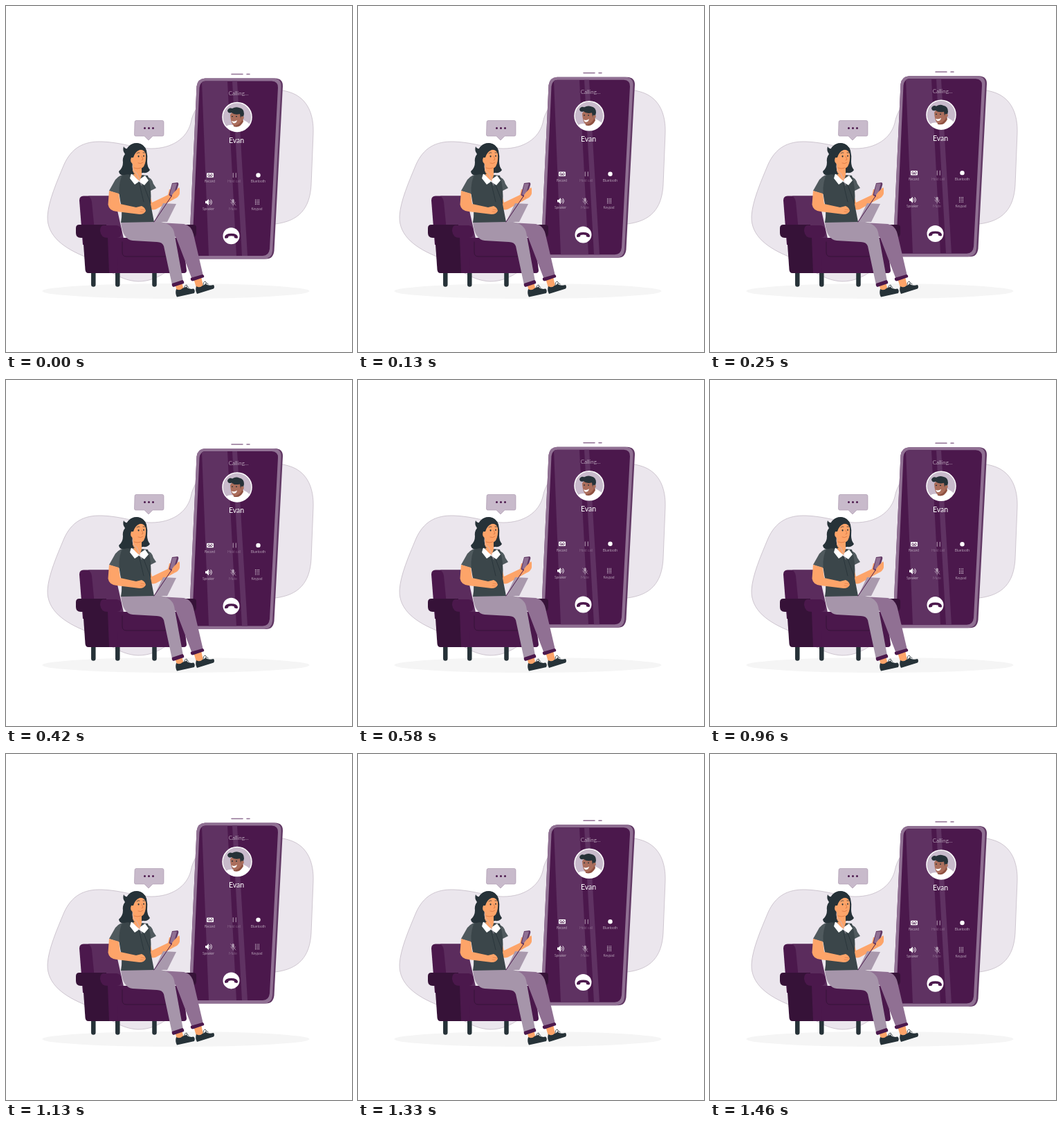
An HTML page that plays this animation: 500x500 px, repeating every 1500 ms.

```html
<!DOCTYPE html>
<html lang="en">
<head>
<meta charset="utf-8">
<title>Calling</title>
<style>
  html, body { margin: 0; width: 100%; height: 100%; overflow: hidden; background: #fff; }
  svg { display: block; width: 100%; height: 100%; }
  text { font-family: Lato, Inter, sans-serif; fill: #fff; text-anchor: middle; }
  .label { font-size: 5px; font-weight: 300; }
  .dim { opacity: .5; }
  .plum { fill: #4b184c; }
  .deep { fill: #361238; }
  .mauve { fill: #907093; }
  .lilac { fill: #c8bacb; }
  .skin { fill: #fda469; }
  .ink { fill: #263238; }
  .white { fill: #fff; }
  .line { fill: none; stroke-linecap: round; stroke-linejoin: round; }
</style>
</head>
<body>
<svg viewBox="0 0 500 500">
  <path fill="#ebe6ed" stroke="#b5aab7" stroke-width=".6" d="M60 304C61 282 74 253 83 231C94 205 112 195 139 196C168 197 187 206 210 206C239 206 261 192 267 169C273 136 304 119 341 118C372 117 399 120 414 126C436 135 445 157 444 184L441 259C439 293 423 311 389 315C350 320 302 332 270 355C240 377 222 398 191 398C166 397 150 383 116 363C83 350 59 332 60 304Z"/>
  <ellipse cx="245.500" cy="412" rx="193" ry="11" fill="#f5f5f5"/>

  <g id="bubble">
    <path class="lilac" stroke="#a693aa" stroke-width=".6" d="M188 165.500H226Q228 165.500 228 168V185.500Q228 188 226 188H212L206 194L200 188H187.500Q185.500 188 185.500 186L186 168Q186 165.500 188 165.500Z"/>
    <path class="line" stroke="#4b184c" stroke-width="3" stroke-dasharray="0 6" d="M200.500 176.500H213"/>
  </g>

  <g id="phone">
    <path class="line" stroke="#907093" stroke-width="1.500" d="M326 97.500H342M348 97.500H352"/>
    <path fill="#623965" d="M288 103.500H389Q400.500 104 400 115L387.500 353Q386 364.500 376 364.500H274Q264 363 264.500 353L275.500 115Q277 104 288 103.500Z"/>
    <path class="mauve" d="M287 103.500H386Q398 104 397.500 115L385 353Q384 364 373 364.500H274Q264 363 264.500 353L275.500 115Q277 104 287 103.500Z"/>
    <path class="plum" d="M288 107.500H384Q393.500 108 393 117L381 350Q380 359.700 371 360H277Q268.500 359 269 351L279.500 117Q280.500 108 288 107.500Z"/>
    <path fill="#5f3262" d="M283 109L286 107.700H320L333 360H293ZM327 107.500H334L349 360H341Z"/>

    <text x="336" y="128" font-size="8" font-weight="300">Calling...</text>
    <g id="avatar">
      <circle class="lilac" cx="334" cy="159.500" r="21"/>
      <path class="white" d="M318 173Q322 170 328 171L341 163Q349 166 352 170A21 21 0 0 1 318 173Z"/>
      <path fill="#8f5141" d="M328 167L341 158L343 166Q338 176 329 173Z"/>
      <path fill="#ab6e5c" d="M324 156L328 151L341 153L342 162Q338 171 331 172Q325 172 324 156Z"/>
      <path class="ink" d="M320 150Q322 145 327 147Q332 144 337 146Q344 147 344 155L342 163L339 161L338 155Q330 157 326 153Q321 155 320 150Z"/>
      <circle fill="#ab6e5c" cx="341.500" cy="160.500" r="2.300"/>
      <path class="ink" d="M326 158h2v1.300h-2ZM332 158h2v1.300h-2Z"/>
      <path class="white" d="M326 165Q330 167 334 164Q333 168.500 329 168.500Q327 168 326 165Z"/>
      <circle cx="334" cy="159.500" r="21" fill="none" stroke="#fff" stroke-width="1.500"/>
    </g>
    <text x="333" y="197" font-size="10.500">Evan</text>

    <g class="white">
      <rect x="290" y="240.300" width="10" height="6.500" rx="1"/>
      <path class="line" stroke="#4b184c" stroke-width=".8" d="M293 242a1.500 1.500 0 1 0 .1 0M297 242a1.500 1.500 0 1 0 .1 0M293 245h4"/>
      <path class="line dim" stroke="#fff" stroke-width="1.200" d="M328.300 240.500v6M332.300 240.500v6"/>
      <circle cx="364.500" cy="243.500" r="3.200"/>
      <path d="M288 280.800h2l3-2.800v9l-3-2.800h-2Z"/>
      <path class="line" stroke="#fff" stroke-width=".9" d="M294.500 280.500q1.500 2 0 4M296 279q3 3.500 0 7"/>
      <g class="dim">
        <rect x="326.500" y="278" width="3.400" height="6" rx="1.700"/>
        <path class="line" stroke="#fff" stroke-width=".8" d="M325 282.500q.5 3 3.200 3q2.700 0 3.200-3M328.200 285.500v2M324.500 278.500l7.500 8.500"/>
      </g>
      <path class="line" stroke="#fff" stroke-width="1.200" stroke-dasharray="0 2.200" d="M360.600 279v6.800M363 279v6.800M365.400 279v6.800"/>
    </g>
    <g class="label">
      <text x="294.500" y="254.500">Record</text>
      <text x="329.500" y="254.500" class="dim">Hold call</text>
      <text x="364.500" y="254.500">Bluetooth</text>
      <text x="292.500" y="293.800">Speaker</text>
      <text x="328" y="293.800" class="dim">Mute</text>
      <text x="362.500" y="293.800">Keypad</text>
    </g>
    <circle class="white" cx="325.500" cy="331.300" r="12"/>
    <path class="plum" d="M316 332.500Q317 328 325.500 327.800Q334 328 335 332.500Q335.300 335 333.500 334.800L330.500 334.200Q329.500 333.500 329.700 331.800Q325.500 330.500 321.500 331.800Q321.500 333.500 320.500 334.200L317.500 334.800Q315.700 335 316 332.500Z"/>
  </g>

  <g id="chair">
    <path class="line" stroke="#263238" stroke-width="6.500" d="M126.300 384V402.500M161.300 384V402.500M214.500 384V402.500"/>
    <path class="plum" d="M106 281Q106 274.500 112 274.500H150V345H111Z"/>
    <path fill="#5b2c5d" d="M119 274.500H150Q157 275 158 282L172 345H130L124 283Q123 277 119 274.500Z"/>
    <path class="deep" d="M240 321Q242 316 247 316H271Q275 316 275 320V329Q274 335 268 335H248Z"/>
    <path class="plum" d="M149 335H255L261 382Q261 386 257 386H149Z"/>
    <path class="line" stroke="#361238" stroke-width="1" d="M168 341V356Q168 362 174 362H250"/>
    <path class="deep" d="M111 330H150V386H119Q115 386 114.500 381Z"/>
    <path class="deep" d="M101 321Q101 316 106 316H145V335H108Q101 335 101 328Z"/>
    <path class="plum" d="M140 317H160Q167 318 167 326Q167 335 160 335L162 386H149L147 335Q137 335 136 325Q136 318 140 317Z"/>
  </g>

  <g id="woman">
    <path class="skin" d="M271 394L282 391L285 405L275 407ZM244 401L254 399L257 411L247 412Z"/>
    <path class="ink" d="M275 405Q280 408 284 404L289 402Q293 405 300 403Q302 406 300 408.500L276 416Q273 411 275 405ZM246 409Q251 412 255 408L260 406Q265 410 271 408.500Q274 411 272 415L247 420.500Q244 415 246 409Z"/>
    <path class="line" stroke="#263238" stroke-width=".8" d="M285 403q0-5 3-5q3 2-1 5M288 402q3-3 4 0M257 408q1-5 4-5q2 2-2 5M260 407q3-3 4 0"/>
    <path class="mauve" d="M222 313L257 315Q268 317 271 330L285 390L269 395L246 335Z"/>
    <path fill="#a695aa" d="M166 312L224 312Q240 315 243 327L256 398L240 403L228 347Q226 341 218 341L183 339Q168 337 166 312Z"/>
    <path class="plum" d="M267 393L284 388Q287 389 286 392L270 397.500Q266 397 267 393ZM240 401L255 396Q258 398 257 401L242 406Q239 405 240 401Z"/>

    <path class="skin" d="M204 259L211 284L234 273L236 265Q241 264 246 270L251 263V271Q250 276 243 279L217 293.500Q209 297 206 289Z"/>
    <path fill="#505a5e" d="M202 246Q211 248 213 257L217 263L207 268ZM177 242Q164 243 158 251L149 267L164 272L178 262Z"/>
    <path fill="#3b464a" d="M175 242L205 245Q211 264 209 286L214 312L166 313Q169 297 165 281Q161 262 167 246Z"/>
    <path class="ink" d="M172 214Q168 209 170 203Q172 207 175 206Q180 198 189 198Q200 199 203 209Q205 217 204 225Q204 232 208 237Q205 242 198 241L184 245Q176 242 172 244Q164 246 163 239Q169 234 169 226Q168 219 172 214Z"/>
    <path class="white" d="M181 242L192 251L201 245L206 252L200 259L192 254L186 258L179 249Z"/>
    <path class="skin" d="M183 226H196V245L193 253Q186 248 183 242Z"/>
    <path class="skin" d="M183 216Q185 209 192 207Q200 207 202 214Q203 225 199 232Q196 236 190 234Q183 232 182 227Q178 225 180 219Z"/>
    <path class="ink" d="M174 208Q179 198 189 198Q201 199 203 212Q199 207 193 208Q186 211 184 219L181 219Q179 224 182 229Q182 239 186 243Q176 242 171 243Q166 236 170 228Z"/>
    <path class="ink" d="M191.500 216a1 1.300 0 1 0 .1 0M199 215.500a.8 1.200 0 1 0 .1 0"/>
    <path class="line" stroke="#263238" stroke-width=".7" d="M189 213q2-2 4-1M198 212l3 0"/>
    <path class="line" stroke="#d97542" stroke-width=".8" d="M196 217l2 5l-2 .7M191 227q4 2 7-1M185 234Q190 236 195 234"/>
    <path class="line" stroke="#c8bacb" stroke-width=".7" d="M183 229Q181 236 189 242L196 259"/>
    <path class="line" stroke="#263238" stroke-width=".8" d="M199 259L209 285M192 254L199 283"/>

    <path fill="#a999ad" d="M227 285L246 286L233 312H214Z"/>
    <path class="line" stroke="#4b184c" stroke-width="1" d="M239 275L214 312"/>
    <path class="skin" d="M149 267L163 271L165 286L188 291L196 289Q201 291 202 296Q200 301 193 301L160 297Q149 296 147.500 287Z"/>
    <path class="line" stroke="#d97542" stroke-width=".6" d="M195 294L201 295M194 297L199 298"/>
    <path fill="#623965" d="M240 256L248 255Q250 256 249 259L244 275Q243 277 241 276L236 274Q235 273 236 271Z"/>
    <path class="mauve" d="M240.500 257L247 256.500L242 274L237 272.500Z"/>
    <path class="skin" d="M243 269L250 262Q252 265 250 271Q247 277 240 276L240 273Z"/>
  </g>
</svg>
<script>
  const PERIOD = 1500, LIFT = 10, REST = 1;
  const phone = document.getElementById("phone");

  function draw(now) {
    const phase = now % PERIOD / PERIOD;
    const rise = LIFT * (1 - Math.abs(2 * phase - 1));
    phone.setAttribute("transform", `translate(0 ${REST - rise})`);
    requestAnimationFrame(draw);
  }
  draw(performance.now());
</script>
</body>
</html>
```
